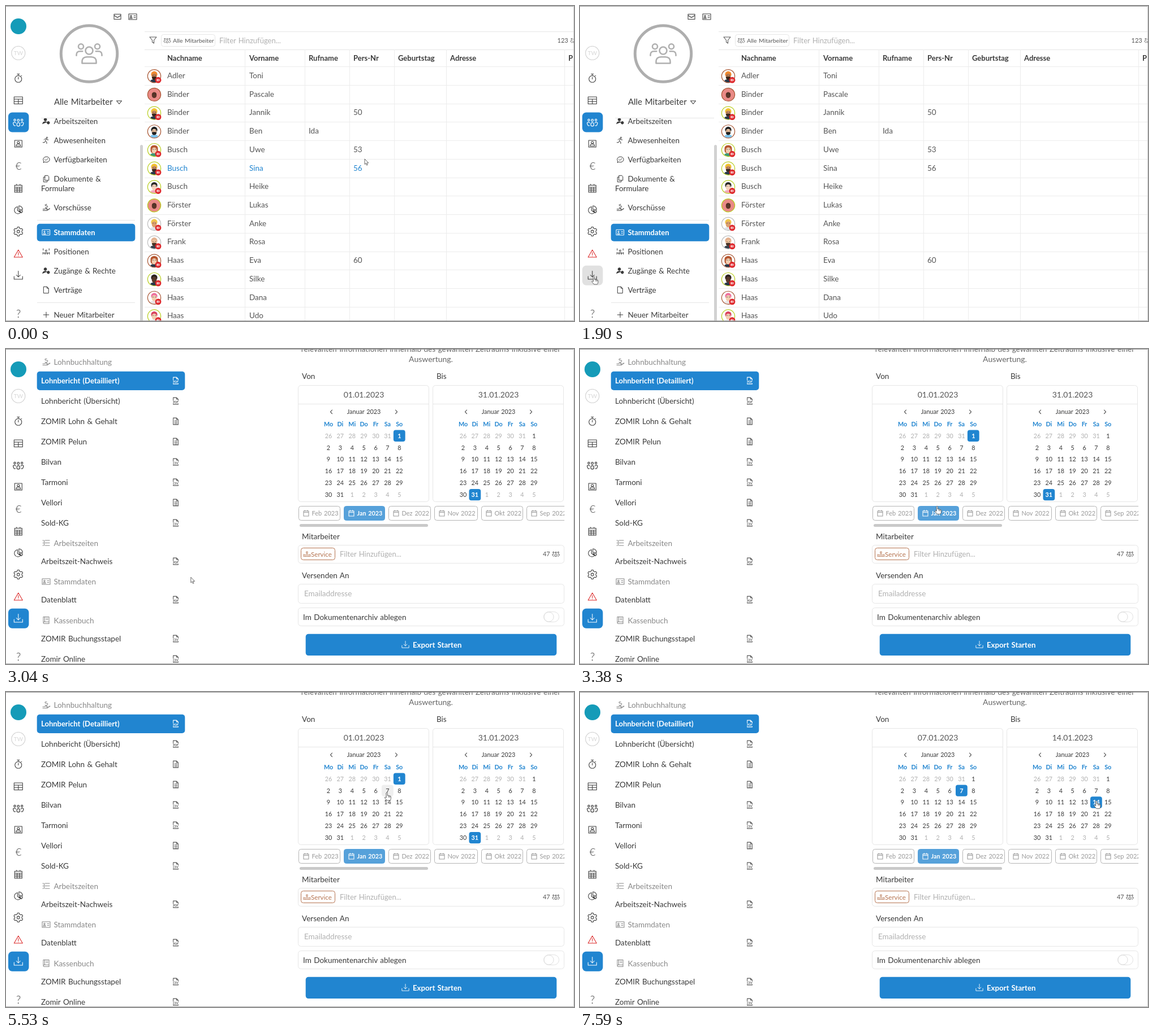
An HTML page for the animation above (8000 ms loop, 1004 by 558 pixels).

```html
<!DOCTYPE html>
<html lang="de">
<head>
<meta charset="utf-8">
<title>Export</title>
<style>
html, body { margin: 0; width: 100%; height: 100%; overflow: hidden; background: #fff; }
svg { display: block; width: 1004px; height: 558px; font-family: Lato, "Open Sans", sans-serif; word-spacing: 1px; }
</style>
</head>
<body>
<svg id="stage" viewBox="0 0 1004 558"></svg>
<script>
const LOOP = 8000, BLUE = '#2185d0', DARK = '#3a3a3a', BODY = '#555', GREY = '#888', PALE = '#b0b0b0', LINE = '#e6e6e6', GRID = '#ececec';
const stage = document.getElementById('stage');

const text = (x, y, s, fill = DARK, size = 13.5, weight = 400, anchor = 'start') =>
  `<text x="${x}" y="${y}" fill="${fill}" font-size="${size}" font-weight="${weight}" text-anchor="${anchor}">${s}</text>`;
const rect = (x, y, w, h, r, fill, stroke = 'none') =>
  `<rect x="${x}" y="${y}" width="${w}" height="${h}" rx="${r}" fill="${fill}" stroke="${stroke}"/>`;
const disc = (x, y, r, fill, stroke = 'none', w = 1) =>
  `<circle cx="${x}" cy="${y}" r="${r}" fill="${fill}" stroke="${stroke}" stroke-width="${w}"/>`;
const path = (d, stroke, fill = 'none', w = 1.05) =>
  `<path d="${d}" stroke="${stroke}" fill="${fill}" stroke-width="${w}" stroke-linejoin="round" stroke-linecap="round"/>`;
const hline = (x1, x2, y, c = LINE) => rect(x1, y, x2 - x1, 1, 0, c);
const vline = (x, y1, y2, c = LINE) => rect(x, y1, 1, y2 - y1, 0, c);
const ring = (x, y, r) => `M${x - r} ${y}a${r} ${r} 0 1 0 ${2 * r} 0a${r} ${r} 0 1 0 ${-2 * r} 0`;
const box = (x, y, w, h) => `M${x} ${y}h${w}v${h}h${-w}z`;

// Icons are centred on 0,0 and about 16 units wide.
const ICONS = {
  watch: ring(0, 1.3, 6) + 'M0 1.5V-2M-2-7.5H2M0-7.5V-5M5-4l1-1',
  table: box(-7.5, -6, 15, 12.5) + 'M-7.5-2H7.5M-7.5 2.3H7.5M0-2V6.5',
  team: ring(0, -3, 1.6) + ring(-5.5, -3.5, 1.4) + ring(5.5, -3.5, 1.4) +
    'M-2.2 5V2q2.2-3.5 4.4 0V5q-2.2 2-4.4 0M-4.5 5q-2 .8-2.7-1l-.8-3q2-2.5 4 0M4.5 5q2 .8 2.7-1l.8-3q-2-2.5-4 0',
  group: ring(0, -2, 2.6) + ring(-5.8, -4.9, 1.8) + ring(5.8, -4.9, 1.8) +
    'M-5 7V6q0-3.5 3.5-3.5h3Q5 2.5 5 6V7ZM-9 1.5V1q0-2.5 2.5-2.5h1.8M9 1.5V1q0-2.5-2.5-2.5h-1.8',
  photo: box(-6.5, -6, 13, 12) + ring(0, -2, 2) + 'M-4 4q0-3.5 4-3.5T4 4Z',
  calendar: box(-6.5, -5.5, 13, 12.5) + 'M-6.5-2H6.5M-6.5 1H6.5M-6.5 4H6.5M-2.2-2V7M2.2-2V7M-3-7.5v2M3-7.5v2',
  day: box(-4.5, -4, 9, 9) + 'M-4.5-1.5h9M-2.2-5.5v2M2.2-5.5v2',
  pie: 'M-1.5-5.5a6.3 6.3 0 1 0 5.5 10.5L-1.5 1ZM1-7v6.5h6.5A6.5 6.5 0 0 0 1-7M1.5 1.5h6q0 2-1.7 4Z',
  gear: 'M-1.5-7.5h3l.6 2.2 2 1.1 2.2-.6 1.5 2.6-1.6 1.6v2.2l1.6 1.6-1.5 2.6-2.2-.6-2 1.1-.6 2.2h-3l-.6-2.2-2-1.1-2.2.6-1.5-2.6 1.6-1.6v-2.2l-1.6-1.6 1.5-2.6 2.2.6 2-1.1z' + ring(0, .5, 2.4),
  warn: 'M0-6.5 7.5 6.5H-7.5ZM0-2V2.5M0 4.4v.2',
  down: 'M0-7.5V3M-3.5-.5 0 3 3.5-.5M-7.5 2V7H7.5V2',
  mail: box(-6, -4.5, 12, 9) + 'M-6-2.5 0 1.5 6-2.5',
  card: box(-7, -5, 14, 10) + ring(-3, -1.3, 1.2) + 'M-5 3q0-2 2-2t2 2ZM2-1.5h3M2 1.5h3',
  funnel: 'M-6-5.5H6L1.5 0V5.5L-1.5 3.5V0Z',
  person: ring(-1.5, -3, 2.5) + 'M-6.5 5q0-4 4-4h2q1 0 2 1' + ring(4, 3, 2.4),
  run: ring(1.5, -5, 1.2) + 'M-4-1l2-2h3l1 2h2M0-2l-2 3 3 2v3M-2 2l-1 2h-3',
  check: 'M-5 5.5l.6-2.5a6 5.2 0 1 1 2.2 1.6ZM-2.5-.3l2 2 3.5-3.5',
  copy: 'M-2-6H3L5-4V3H-2ZM-2-3H-5V6H2V3',
  hand: 'M-6 3h3l2-1h3l-1 2h3l3-2M-6 5.5h8l4-3.5M1-6q-3 0-3 1.5t3 1.5 1 2.5-4 .5',
  stars: ring(0, -1.5, 1.5) + 'M-5.5-5.5v3M5.5-5.5v3M-6 5V1.5l2 2 2-2V5M2 5V1.5l2 2 2-2V5M-2 5q0-3 2-3t2 3',
  crowd: ring(0, -4, 1.6) + 'M-7 4.5h14M-6.5 4V0l2.5 2L0-1.5 4 2 6.5 0V4M-3 4l3-3 3 3',
  file: 'M-4.5-6H1.5L4.5-3V6H-4.5ZM1.5-6V-3H4.5',
  lines: 'M-2-4.5H6M-2 0H6M-2 4.5H6M-5.5-5v1M-5.5-.5v1M-5.5 4v1M-3.5-4.5v9',
  book: 'M-5 4.5V-6H5V3H-3.5q-1.5 0-1.5 1.5T-3.5 6H5V3M-2.5-6V3M0-3.5h3M0-1h3',
  plus: 'M-5 0H5M0-5V5'
};
const icon = (name, x, y, color = DARK, scale = 1, fill = 'none') =>
  `<g transform="translate(${x} ${y}) scale(${scale})">${path(ICONS[name], color, fill)}</g>`;

const MENU = [
  ['person', 204, 'Arbeitszeiten'], ['run', 238, 'Abwesenheiten'], ['check', 272, 'Verfügbarkeiten'],
  ['copy', 306, 'Dokumente &amp;'], ['hand', 357, 'Vorschüsse'], ['card', 401, 'Stammdaten'],
  ['stars', 435, 'Positionen'], ['person', 469, 'Zugänge &amp; Rechte'], ['file', 503, 'Verträge'],
  ['plus', 547, 'Neuer Mitarbeiter']
];
const COLUMNS = [[285, 'Nachname'], [430, 'Vorname'], [535, 'Rufname'], [614, 'Pers-Nr'], [693, 'Geburtstag'], [785, 'Adresse'], [994, 'P']];
const ROW = 32.72, TOP = 107.3;

// Surname, first name, nickname, number; then ring, hair, skin, shirt, beard or '-'.
const STAFF = `Adler,Toni,,,#a5512d,#f28a2e,#b97a50,#26384a,#3a2418
Binder,Pascale,,,#a5512d,#e98a86,#5a3528,#e98a86,-
Binder,Jannik,,50,#b5cc18,#f2c230,#c98d63,#26384a,#3a2a20
Binder,Ben,Ida,,#a5512d,#222,#f0c4a0,#7cc4ee,#222
Busch,Uwe,,53,#b5cc18,#b5562f,#f3cdb0,#3f9a78,-
Busch,Sina,,56,#b5cc18,#f2c230,#c98d63,#26384a,#3a2a20
Busch,Heike,,,#b5cc18,#2a2a2a,#f6d3bd,#f2a9b8,-
Förster,Lukas,,,#b5cc18,#e98a86,#5a3528,#e98a86,-
Förster,Anke,,,#bbb,#f0c64a,#dca070,#dde3e8,-
Frank,Rosa,,,#bbb,#e3b18f,#f0c4a0,#33414e,#4a3428
Haas,Eva,,60,#a5512d,#b5562f,#f3cdb0,#26384a,-
Haas,Silke,,,#b5cc18,#2b211d,#5a3a2a,#26384a,-
Haas,Dana,,,#a5512d,#ee6f9e,#f3cdb0,#e8e4e4,-
Haas,Udo,,,#b5cc18,#d9425f,#f3cdb0,#eceff2,-`.split('\n').map(s => s.split(','));

function avatar(i, y) {
  const [, , , , edge, hair, skin, shirt, beard] = STAFF[i], pink = i == 1 || i == 7;
  let s = disc(0, 0, 11.4, pink ? hair : '#fff');
  s += path('M-7 8.8Q-5.5 5.5 0 5.5T7 8.8a11.2 11.2 0 0 1-14 0', 'none', shirt);
  if (i == 4 || i == 10) s += rect(-6.5, -8, 13, 14, 5, hair);
  s += disc(0, -3, 5.6, hair) + rect(-4.2, -4.5, 8.4, 10.5, 4.2, skin);
  if (beard != '-') s += path('M-4.2 1.5Q0 0 4.2 1.5 4 6.2 0 6.2T-4.2 1.5', 'none', beard);
  s += path('M-2-1.5v.3M2-1.5v.3', '#222', 'none', 1.1);
  s += disc(0, 0, 11.6, 'none', edge, 1.2);
  if (i != 1 && i != 3 && i != 7)
    s += disc(7, 7, 5.4, '#dd2327') + path('M5.2 5v4M7.2 5v4M9.2 5.5v3M4.5 7h3', '#fff', 'none', .9);
  return `<g transform="translate(262 ${y})">${s}</g>`;
}

function staffPage(x, y) {
  const row = x > 245 ? Math.floor((y - TOP) / ROW) : -1;
  let s = icon('mail', 197, 19) + icon('card', 224, 19);
  s += disc(147, 84.5, 49.7, '#fff', '#aeaeae', 5) + icon('group', 147, 84, '#b0b0b0', 2.5);
  s += text(85, 175, 'Alle Mitarbeiter', DARK, 14.9) + path('M195.5 168h9l-4.5 5.5z', DARK);
  for (const [name, cy, label] of MENU) {
    const on = cy == 401, c = on ? '#fff' : DARK;
    if (on) s += rect(54.7, 385.7, 173.6, 31, 5, BLUE);
    else if (x > 55 && x < 228 && Math.abs(y - cy) < 15) s += rect(55, cy - 15, 173, 30, 5, '#f2f2f2');
    s += icon(name, 71, cy, c, .95, name == 'person' ? c : 'none') + text(84.5, cy + 5, label, c, on ? 13 : 13.4, on ? 700 : 400);
  }
  s += text(62, 328, 'Formulare', DARK, 13.4) + hline(62, 237, 198) + hline(55, 228, 379) + hline(55, 228, 525);
  s += rect(237, 246, 5, 320, 2.5, '#d2d2d2');
  s += hline(245, 1004, 45) + icon('funnel', 260, 60.5, BODY) + rect(274.5, 50.5, 95, 21, 4, '#fff', LINE);
  s += icon('team', 285, 61, BODY, .75) + text(295, 65, 'Alle Mitarbeiter', BODY, 10.4) + text(377, 66, 'Filter Hinzufügen...', PALE, 13);
  s += text(974.5, 64.5, '123', BODY, 11) + icon('team', 1004, 61, BODY, .75);
  s += hline(245, 1004, 77);
  for (const cx of [422, 528, 607, 686, 778, 987]) s += vline(cx, 77, 558, GRID);
  for (const [cx, label] of COLUMNS) s += text(cx, 96.5, label, DARK, 13, 700);
  STAFF.forEach((p, i) => {
    const ry = TOP + i * ROW;
    s += hline(245, 1004, Math.round(ry), GRID) + avatar(i, ry + 16.9);
    for (let k = 0; k < 4; k++) s += text(COLUMNS[k][0], ry + 20.7, p[k], i == row ? BLUE : BODY);
  });
  return s;
}

const REPORTS = [
  ['Lohnbericht (Detailliert)', 56, 'PDF'], ['Lohnbericht (Übersicht)', 92, 'PDF'], ['ZOMIR Lohn &amp; Gehalt', 128, ''],
  ['ZOMIR Pelun', 164, ''], ['Bilvan', 200, 'CSV'], ['Tarmoni', 236, 'CSV'], ['Vellori', 272, ''], ['Sold-KG', 308, 'CSV'],
  ['Arbeitszeit-Nachweis', 376, 'PDF'], ['Datenblatt', 444, 'PDF'], ['ZOMIR Buchungsstapel', 513, 'CSV'], ['Zomir Online', 549, 'CSV']
];
const HEADS = [['hand', 'Lohnbuchhaltung', 23], ['lines', 'Arbeitszeiten', 343.5], ['card', 'Stammdaten', 412], ['book', 'Kassenbuch', 480.5]];
const MONTHS = [[517, 74, 'Feb 2023'], [597, 73, 'Jan 2023'], [676, 75, 'Dez 2022'], [757, 77, 'Nov 2022'], [840, 74, 'Okt 2022'], [920, 75, 'Sep 2022']];
const CELL = 20.88, CAL_X = [570, 808], CAL_Y = 153.7;

// Index of the day cell under a point, or -1.
function dayAt(left, x, y) {
  const c = Math.round((x - left) / CELL), r = Math.round((y - CAL_Y) / CELL);
  return c >= 0 && c < 7 && r >= 0 && r < 6 ? r * 7 + c : -1;
}

function calendar(left, date, picked, hover) {
  const mid = left + 62.5;
  let s = rect(left - 53.5, 64.5, 231, 206, 5, '#fff', LINE) + hline(left - 53, left + 178, 97);
  s += text(mid, 85.5, date, BODY, 14, 400, 'middle') + text(mid, 115, 'Januar 2023', DARK, 10.8, 400, 'middle');
  s += path(`M${left + 6.5} 108l-3 3.3 3 3.3M${left + 118.5} 108l3 3.3-3 3.3`, DARK);
  ['Mo', 'Di', 'Mi', 'Do', 'Fr', 'Sa', 'So'].forEach((d, i) => s += text(left + i * CELL, 136.5, d, BLUE, 10.8, 700, 'middle'));
  for (let i = 0; i < 42; i++) {
    const x = left + i % 7 * CELL, y = CAL_Y + Math.floor(i / 7) * CELL;
    const day = i < 6 ? 26 + i : i < 37 ? i - 5 : i - 36;
    if (i == picked || i == hover) s += rect(x - 10.4, y - 10.2, 20.8, 20.4, 4, i == picked ? BLUE : '#efefef');
    s += text(x, y + 4, day, i == picked ? '#fff' : i < 6 || i > 36 ? PALE : DARK, 10.8, i == picked ? 700 : 400, 'middle');
  }
  return s;
}

function exportPage(t, x, y) {
  let s = rect(54.7, 39.7, 261.6, 33.2, 5, BLUE);
  for (const [name, label, cy] of HEADS) s += icon(name, 71, cy, GREY) + text(84.5, cy + 5, label, GREY);
  REPORTS.forEach(([label, cy, type], i) => {
    const c = i ? DARK : '#fff';
    s += text(62, cy + 4.8, label, c, i ? 13.5 : 13, i ? 400 : 700) + icon('file', 300, cy, i ? BODY : c, .98);
    s += type ? rect(294, cy - .5, 11.5, 5, 0, i ? '#fff' : BLUE) + text(300, cy + 3.8, type, i ? BODY : c, 5, 700, 'middle')
      : path(`M298 ${cy - 1}h4.5M298 ${cy + 1.5}h4.5M298 ${cy + 4}h4.5`, BODY);
  });
  s += text(751, 5, 'relevanten Informationen innerhalb des gewählten Zeitraums inklusive einer', '#666', 13.6, 400, 'middle');
  s += text(751, 22.5, 'Auswertung.', '#666', 14, 400, 'middle');
  s += text(523, 53, 'Von') + text(761, 53, 'Bis');
  s += calendar(CAL_X[0], t < 6000 ? '01.01.2023' : '07.01.2023', t < 6000 ? 6 : 12, dayAt(CAL_X[0], x, y));
  s += calendar(CAL_X[1], t < 7590 ? '31.01.2023' : '14.01.2023', t < 7590 ? 36 : 19, dayAt(CAL_X[1], x, y));
  let chips = '';
  MONTHS.forEach(([cx, w, label], i) => {
    const on = i == 1, c = on ? '#fff' : '#999';
    chips += rect(cx + .5, 278.5, w - 1, 25, 4, on ? '#56a1da' : '#fff', on ? '#56a1da' : '#b5b5b5');
    chips += icon('day', cx + 13.5, 291, c) + text(cx + 23.5, 295, label, c, on ? 10.8 : 11, on ? 700 : 400);
  });
  s += `<svg x="0" y="0" width="987" height="558">${chips}</svg>`;
  s += rect(519, 310, t < 2650 ? 225.5 : 227, 5, 2.5, '#c9c9c9');
  s += text(523, 337, 'Mitarbeiter') + rect(516.5, 347.5, 470, 32, 5, '#fff', LINE);
  s += rect(521.5, 352.5, 60, 21, 4, '#fff', '#b5734f') + icon('crowd', 532, 363.5, '#b5734f', .85) + text(539, 367.5, 'Service', '#b5734f', 11.6);
  s += text(590, 368, 'Filter Hinzufügen...', PALE, 13) + text(949, 367, '47', BODY, 10.8) + icon('team', 972, 363, DARK, .78);
  s += text(523, 406, 'Versenden An') + rect(516.5, 416.5, 470, 34, 5, '#fff', LINE) + text(527, 438, 'Emailaddresse', PALE);
  s += rect(516.5, 458.5, 470, 32, 5, '#fff', LINE) + text(525, 479.5, 'Im Dokumentenarchiv ablegen');
  s += rect(950.5, 465.5, 27, 18, 9, '#fff', '#e2e2e2') + disc(959.5, 474.5, 8.5, '#fff', '#ddd');
  s += rect(529.7, 504.7, 443.6, 38.4, 5, BLUE) + icon('down', 706, 523.5, '#fff', .82) + text(719, 528.5, 'Export Starten', '#fff', 13.2, 700);
  return s;
}

const NAV = [['watch', 128], ['table', 167], ['team', 206], ['photo', 244], ['calendar', 323], ['pie', 361], ['gear', 399], ['warn', 438.5], ['down', 477]];

function sidebar(t, exporting) {
  const tile = (y, fill) => rect(4, y, 36.4, 35, 7, fill);
  let s = t < 1210 || t >= 2650 ? disc(22, 36, 14, '#159bb8') : '';
  s += disc(21.8, 83.3, 12, '#fff', '#cfcfcf', 1.1) + text(22, 87, 'TW', '#d8d8d8', 10, 400, 'middle');
  if (exporting) s += tile(459.8, BLUE);
  else s += tile(188.5, BLUE) + (t >= 1260 ? tile(459.8, '#e1e1e1') : '');
  for (const [name, y] of NAV) {
    const on = name == (exporting ? 'down' : 'team');
    s += icon(name, 21.8, y, on ? '#fff' : name == 'warn' ? '#db2828' : DARK, name == 'team' ? 1.15 : 1);
  }
  return s + text(22, 289.5, '€', DARK, 18, 300, 'middle') + text(22, 551.5, '?', DARK, 19, 300, 'middle');
}

// Pointer path: time, x, y.
const TRACK = [
  [0, 634, 271.3], [340, 634, 271.3], [1140, 177, 465], [1210, 100, 471], [1260, 43, 473], [1590, 43, 473], [1650, 24.5, 478.5],
  [2650, 24.5, 478.5], [2760, 75, 499], [3000, 290, 420], [3380, 631, 278], [3450, 637, 262], [3750, 648, 235], [4140, 648, 235],
  [4340, 627.5, 235.5], [4500, 613, 232], [4930, 669, 186], [5300, 673, 177.5], [6250, 673, 177.5], [6640, 790, 206],
  [7040, 911, 192.5], [7100, 912.5, 192], [LOOP, 912.5, 192]
];
function pointer(t) {
  const i = TRACK.findIndex(k => k[0] > t), [t0, x0, y0] = TRACK[i - 1], [t1, x1, y1] = TRACK[i];
  const f = (t - t0) / (t1 - t0);
  return [x0 + (x1 - x0) * f, y0 + (y1 - y0) * f];
}
const HAND = 'M-1 1.2Q0-.6 1.1 1.2V6Q2.6 4.8 3.4 6.2 4.8 5.4 5.4 6.8 7.2 6.2 7.4 8V11Q7.2 13 6 14.6H.3L-3.8 9.6Q-3.6 7.6-1 9.3ZM3.4 6.2V9M5.4 6.8V9.2';
const ARROW = 'M0 0V9.2L2.1 7.3 3.6 10.8 5.2 10.1 3.7 6.7H6.4Z';

function scene(t) {
  const exporting = t >= 2240, [x, y] = pointer(t);
  const hand = x < 245 || exporting && (x < 316 || y > 277 && y < 305 && x > 516 || CAL_X.some(left => dayAt(left, x, y) >= 0));
  return (exporting ? exportPage(t, x, y) : staffPage(x, y)) + sidebar(t, exporting) +
    hline(0, 1004, 0, '#999') + hline(0, 1004, 557, '#aaa') + vline(1003, 0, 558, '#ccc') +
    `<g transform="translate(${x} ${y})">${path(hand ? HAND : ARROW, '#444', '#fff', .8)}</g>`;
}

const start = performance.now();
let shown = '';
function frame() {
  const next = scene((performance.now() - start) % LOOP);
  if (next != shown) stage.innerHTML = shown = next;
  requestAnimationFrame(frame);
}
frame();
</script>
</body>
</html>
```
